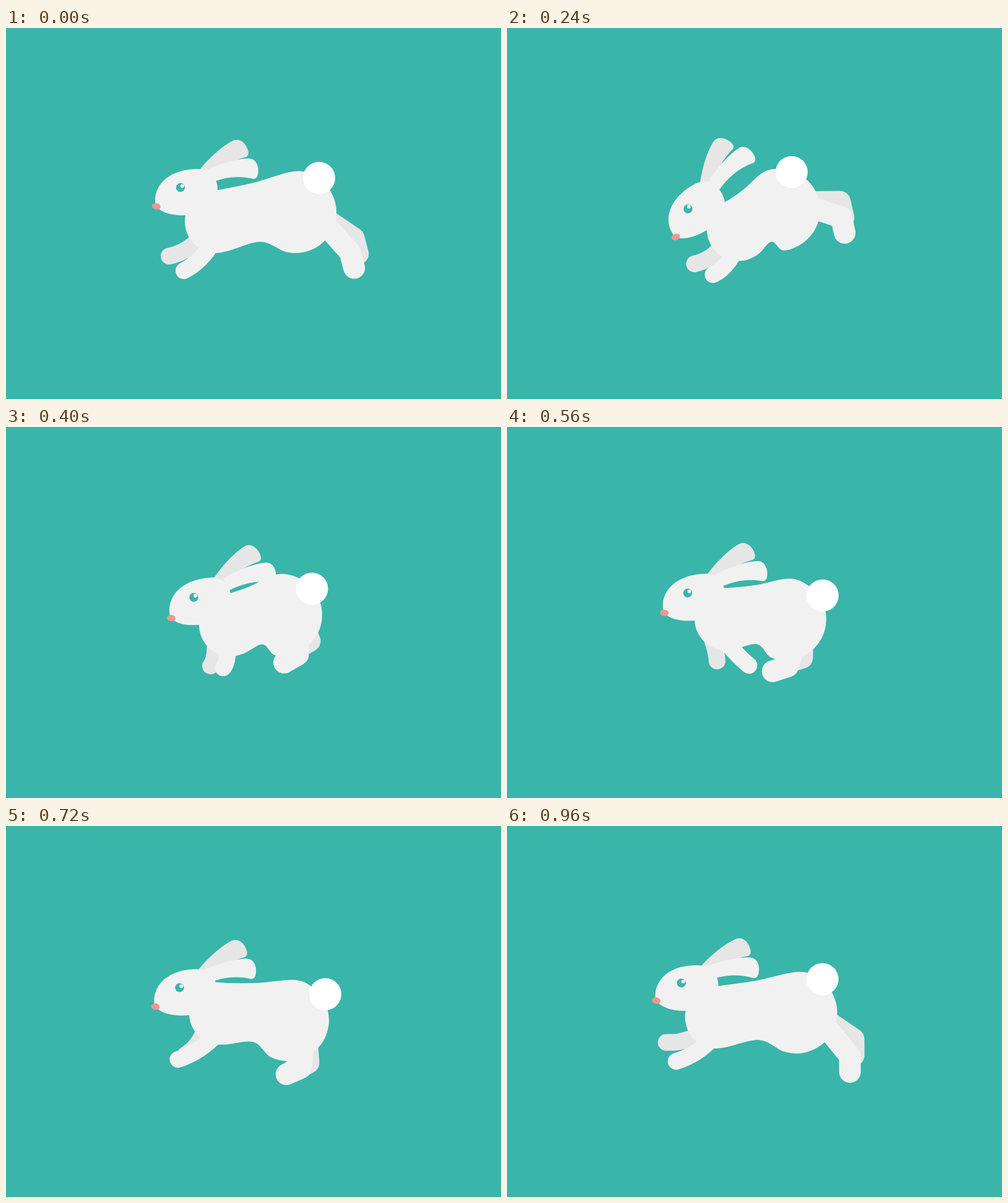
These frames come from a looping animation (800x600 px, 1000 ms). An HTML page with a canvas:

```html
<!DOCTYPE html>
<html lang="en">
<head>
<meta charset="utf-8">
<title>Running rabbit</title>
<style>
  html, body { margin: 0; width: 100%; height: 100%; overflow: hidden; background: #39b5aa; }
  canvas { display: block; }
</style>
</head>
<body>
<canvas id="stage" width="800" height="600"></canvas>
<script>
const ctx = document.getElementById('stage').getContext('2d');
const LOOP = 1000, STEP = 40, RAD = Math.PI / 180;
const TEAL = '#39b5aa', NEAR = '#f1f1f1', FAR = '#e6e6e6', PINK = '#f29693';
const CHEST_R = 51, RUMP_R = 66, TAIL_R = 26;
const ARM_W = 27, LEG_W = 35, FOOT = 26;

// Key poses of the gallop. Head: eye and tilt; paws and heels: near, far; foot: angle.
const POSES = [
  { t: 0, head: [282, 258, 0], chest: [340, 313], rump: [468, 298], tail: [506, 242.5],
    paws: [287.5, 392.5, 263.5, 369], heels: [556, 363, 562, 340], foot: [75] },
  { t: 240, head: [292.5, 292.5, -28.6], chest: [374, 326], rump: [440, 294], tail: [460, 233],
    paws: [333, 399, 303, 381.5], heels: [540, 306, 538, 281], foot: [77] },
  { t: 400, head: [303.5, 275.5, -4.5], chest: [363, 320], rump: [445, 304], tail: [494.5, 261.5],
    paws: [351, 389.5, 330.5, 386.5], heels: [472, 368, 491, 346], foot: [150] },
  { t: 560, head: [292, 268.5, -2.4], chest: [354, 310], rump: [450, 311], tail: [510, 272.5],
    paws: [391, 385.5, 339.5, 378.5], heels: [454, 387, 477, 373], foot: [162] },
  { t: 720, head: [280.5, 261.5, 0], chest: [347, 303], rump: [456, 314], tail: [516, 272],
    paws: [278, 377.5, 290, 370], heels: [477, 391, 489, 383], foot: [156] },
  { t: 840, head: [282.5, 247.5, 7.6], chest: [341, 298], rump: [461, 315], tail: [515.5, 265.5],
    paws: [237.5, 345, 248.5, 297], heels: [535, 393, 541, 356], foot: [143] }
];

const HEAD = new Path2D('M-41 17C-38-12-10-30 28-30C50-30 60-15 60 4C60 30 40 45 5 45C-20 45-35 38-41 28Z');
const EAR = new Path2D('M-70 3C-40-11-14-16 0-16C10-16 15-6 15 3C15 12 13 17 7 17C-15 12-35 13-64 24Z');

// Smooth cyclic interpolation of one part between the key poses
function pose(part, t) {
  const n = POSES.length;
  const key = i => POSES[(i + n) % n];
  const time = i => key(i).t + LOOP * Math.floor(i / n);
  let i = n - 1;
  while (POSES[i].t > t) i--;
  const slope = (j, k) => {
    const a = time(j) - time(j - 1), b = time(j + 1) - time(j);
    const [p, q, r] = [-1, 0, 1].map(o => key(j + o)[part][k]);
    return ((q - p) / a * b + (r - q) / b * a) / (a + b);
  };
  const h = time(i + 1) - time(i), u = (t - time(i)) / h, v = 1 - u;
  return key(i)[part].map((x, k) =>
    x * (1 + 2 * u) * v * v + key(i + 1)[part][k] * u * u * (3 - 2 * u) +
    h * u * v * (slope(i, k) * v - slope(i + 1, k) * u));
}

const polar = ([x, y], r, a) => [x + r * Math.cos(a), y + r * Math.sin(a)];

// Points on a circle, evenly spaced from one angle to another
const arc = (c, r, from, to, n = 7) => Array.from({ length: n + 1 },
  (_, i) => polar(c, r, from + (to - from) * i / n));

function blob(points, color) {
  const n = points.length;
  const at = i => points[(i + n) % n];
  ctx.beginPath();
  ctx.moveTo(...points[0]);
  for (let i = 0; i < n; i++) {
    const [a, b, c, d] = [at(i - 1), at(i), at(i + 1), at(i + 2)];
    ctx.bezierCurveTo(b[0] + (c[0] - a[0]) / 6, b[1] + (c[1] - a[1]) / 6,
      c[0] - (d[0] - b[0]) / 6, c[1] - (d[1] - b[1]) / 6, c[0], c[1]);
  }
  ctx.fillStyle = color;
  ctx.fill();
}

function ellipse(x, y, rx, ry, color, turn = 0) {
  ctx.beginPath();
  ctx.ellipse(x, y, rx, ry, turn, 0, 2 * Math.PI);
  ctx.fillStyle = color;
  ctx.fill();
}

function limb(width, color, trace) {
  ctx.beginPath();
  trace();
  ctx.lineWidth = width;
  ctx.strokeStyle = color;
  ctx.stroke();
}

function placed(x, y, deg, paint) {
  ctx.save();
  ctx.translate(x, y);
  ctx.rotate(deg * RAD);
  paint();
  ctx.restore();
}

function shape(path, color) {
  ctx.fillStyle = color;
  ctx.fill(path);
}

// Chest and rump are circles; the waist lies across the line between them
function body(chest, rump, axis) {
  const mid = [(chest[0] + rump[0]) / 2, (chest[1] + rump[1]) / 2];
  const turn = deg => axis + deg * RAD;
  blob([
    ...arc(chest, CHEST_R, turn(76), turn(280)),
    polar(mid, 55, turn(-90)),
    ...arc(rump, RUMP_R, turn(-86), turn(110)),
    polar(mid, 41, turn(86))
  ], NEAR);
}

function arm([x, y], px, py, color) {
  limb(ARM_W, color, () => {
    ctx.moveTo(x, y);
    ctx.quadraticCurveTo((x + px) / 2 + 5, (y + py) / 2 + 9, px, py);
  });
}

function leg(hip, hx, hy, foot, color) {
  limb(LEG_W, color, () => {
    ctx.moveTo(...hip);
    ctx.lineTo(hx, hy);
    ctx.lineTo(...polar([hx, hy], FOOT, foot));
  });
}

function draw(t) {
  const [chest, rump, tail, paws, heels] =
    ['chest', 'rump', 'tail', 'paws', 'heels'].map(part => pose(part, t));
  const [x, y, tilt] = pose('head', t);
  const foot = pose('foot', t)[0] * RAD;
  const axis = Math.atan2(rump[1] - chest[1], rump[0] - chest[0]);
  const hip = polar(rump, 28, axis);
  // The ears slide back as the head drops
  const slide = 8 + 7 * Math.sin(2 * Math.PI * (t - 80) / LOOP);

  ctx.fillStyle = TEAL;
  ctx.fillRect(0, 0, 800, 600);
  placed(x, y, tilt, () =>
    placed(90.5 + slide * 0.35, -61.5, -26 + tilt * 0.1, () => shape(EAR, FAR)));
  leg(hip, heels[2], heels[3], foot, FAR);
  arm([chest[0] - 25, chest[1] + 25], paws[2], paws[3], FAR);
  body(chest, rump, axis);
  leg(hip, heels[0], heels[1], foot, NEAR);
  arm([chest[0] - 5, chest[1] + 32], paws[0], paws[1], NEAR);
  placed(x, y, tilt, () => {
    shape(HEAD, NEAR);
    placed(106 + slide, -31, tilt * 0.15, () => shape(EAR, NEAR));
    ellipse(0, 0, 7.2, 7.2, TEAL);
    ellipse(2.8, -2.4, 2.9, 2.9, '#fff');
    ellipse(-39, 30.5, 7, 5.2, PINK, 0.17);
  });
  ellipse(...tail, TAIL_R, TAIL_R, '#fff');
}

ctx.lineCap = ctx.lineJoin = 'round';
const start = performance.now();
function tick() {
  const t = (performance.now() - start) % LOOP;
  draw(Math.floor(t / STEP) * STEP);
  requestAnimationFrame(tick);
}
tick();
</script>
</body>
</html>
```
